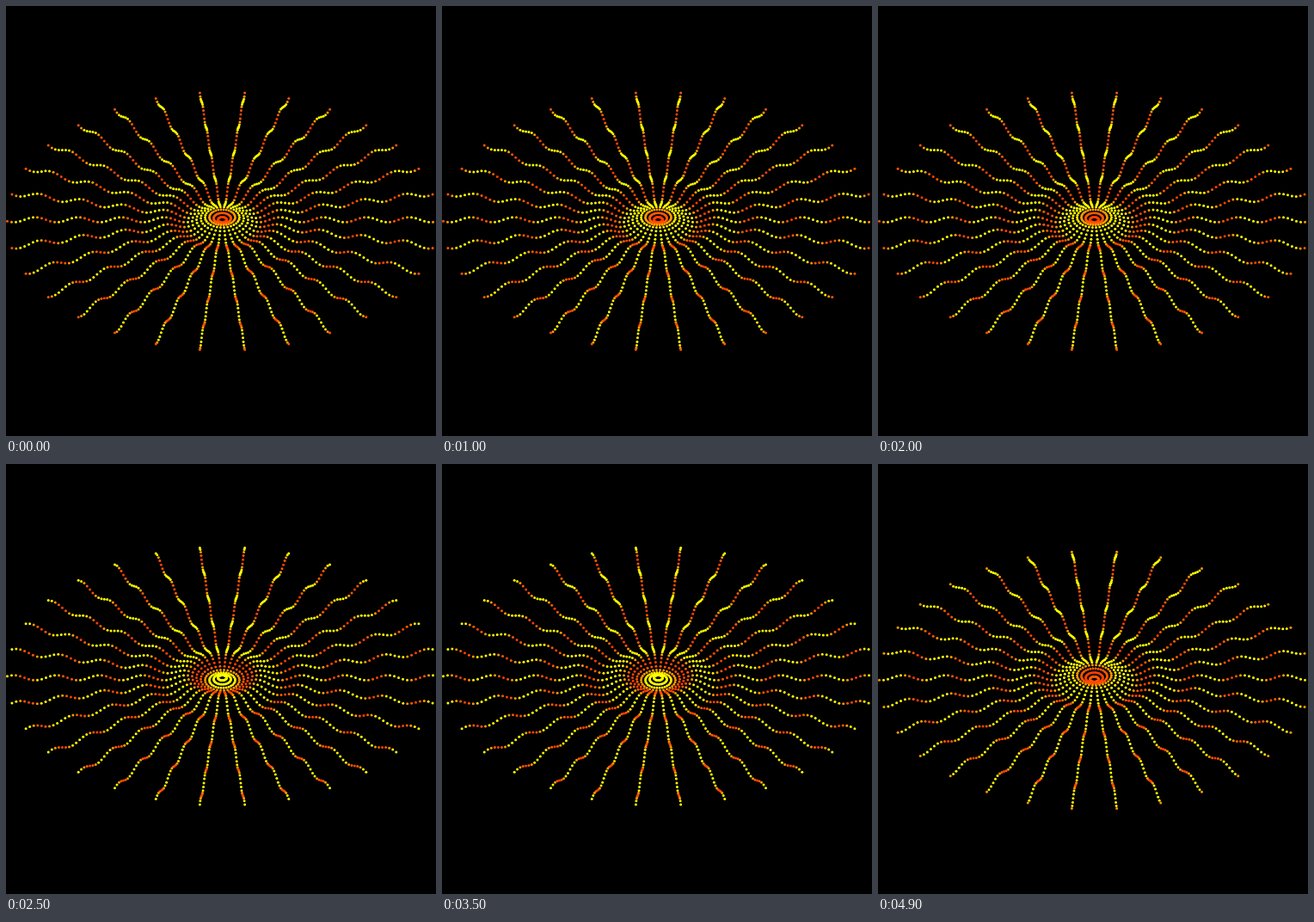
Write an HTML page with a canvas that moves like this. It is 500 px wide and 500 px high and loops after 5 s.

```html
<!DOCTYPE html>
<html lang="en">
<head>
<meta charset="utf-8">
<title>Radial ripple</title>
<style>
  html, body { margin: 0; width: 100%; height: 100%; overflow: hidden; background: #000; }
  canvas { display: block; width: 500px; height: 500px; }
</style>
</head>
<body>
<canvas id="stage" width="500" height="500"></canvas>
<script>
  const ctx = document.getElementById("stage").getContext("2d");
  const TAU = Math.PI * 2;
  const RAYS = 30, RINGS = 50, STEPS = 10, STEP_MS = 100;
  const CX = 251.5, CY = 248.5, GAP = 5, TILT = 0.6;
  const WAVE = 3, DOT = 1.5, PHASE = 55 / 360 * TAU;

  function drawRing(ring, step) {
    const psi = PHASE + TAU * (ring + step) / STEPS;
    const y0 = CY + WAVE * Math.cos(psi);
    const green = Math.min(255, Math.round(195 - 132 * Math.sin(psi)));
    const r = ring * GAP;
    ctx.fillStyle = `rgb(255, ${green}, 0)`;
    for (let i = 0; i < RAYS; i++) {
      const a = TAU * i / RAYS;
      ctx.beginPath();
      ctx.arc(CX + r * Math.cos(a), y0 + r * TILT * Math.sin(a), DOT, 0, TAU);
      ctx.fill();
    }
  }

  function draw(step) {
    ctx.fillStyle = "#000";
    ctx.fillRect(0, 0, 500, 500);
    for (let ring = 1; ring <= RINGS; ring++) drawRing(ring, step);
  }

  const start = performance.now();
  let shown = 0;

  function tick() {
    const step = Math.floor((performance.now() - start) / STEP_MS) % STEPS;
    if (step !== shown) draw(shown = step);
    requestAnimationFrame(tick);
  }

  draw(0);
  requestAnimationFrame(tick);
</script>
</body>
</html>
```
